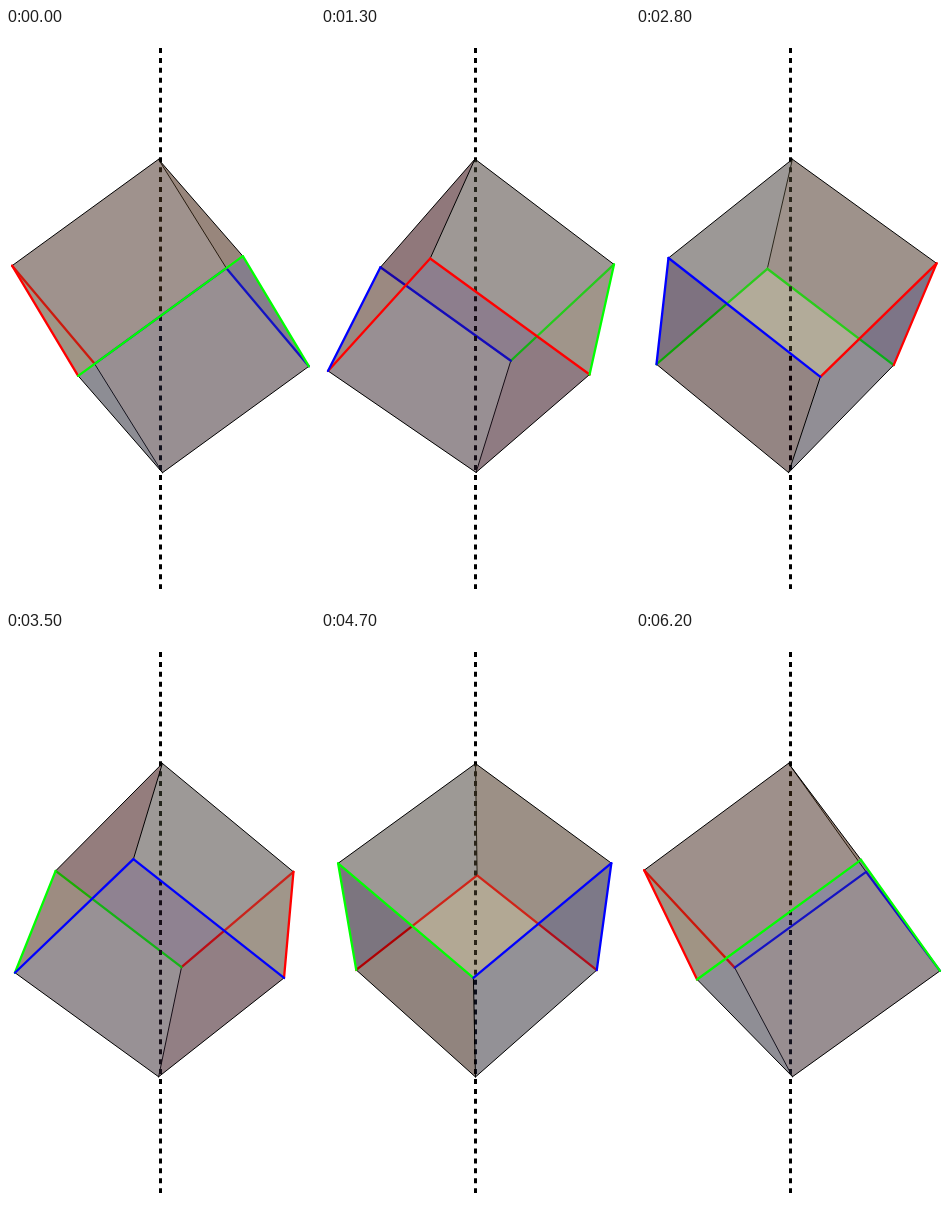
Write an HTML page with a canvas that moves like this. It is 309 by 576 pixels and loops after 6300 ms.

```html
<!DOCTYPE html>
<html lang="en">
<head>
<meta charset="utf-8">
<title>Cube spinning on its diagonal</title>
<style>
html, body { margin: 0; width: 100%; height: 100%; overflow: hidden; background: #fff; }
canvas { display: block; }
</style>
</head>
<body>
<canvas id="stage" width="309" height="576"></canvas>
<script>
const ctx = document.getElementById('stage').getContext('2d');
const CENTER = { x: 154.5, y: 288 };
const CAMERA = 1150;        // distance from the cube's centre
const RADIUS = 156.7;       // half of the body diagonal
const LEAN = 0.0128;        // the diagonal is slightly off the axis
const OPACITY = 0.35;
const STEP_MS = 100, STEPS = 63;
const COLORS = ['#f00', '#0f0', '#00f'];

// Corners 0-3: top and its three neighbours; 4-7: their opposites.
const opposite = i => (i + 4) % 8;
const upper = [[0, RADIUS, 0]];
for (let k = 0; k < 3; k++) {
  const a = (-90 + 120 * k) * Math.PI / 180;
  const r = RADIUS * Math.sqrt(8) / 3;
  upper.push([r * Math.sin(a), RADIUS / 3, r * Math.cos(a)]);
}
const leaned = upper.map(([x, y, z]) => [
  x * Math.cos(LEAN) - y * Math.sin(LEAN),
  x * Math.sin(LEAN) + y * Math.cos(LEAN),
  z
]);
const corners = [...leaned, ...leaned.map(p => p.map(v => -v))];

const faces = [], edges = [];
for (let k = 0; k < 3; k++) {
  const a = 1 + k, b = 1 + (k + 1) % 3, c = 1 + (k + 2) % 3;
  const face = [0, a, opposite(c), b];
  faces.push(face, face.map(opposite));
  edges.push({ ends: [0, a] }, { ends: [4, opposite(a)] });
}
for (let k = 0; k < 3; k++) {
  for (let j = 0; j < 3; j++) {
    if (j !== k) edges.push({ ends: [1 + k, 5 + j], color: COLORS[k] });
  }
}

function spin([x, y, z], angle) {
  const c = Math.cos(angle), s = Math.sin(angle);
  return [x * c + z * s, y, z * c - x * s];
}

function project([x, y, z]) {
  const scale = CAMERA / (CAMERA - z);
  return [CENTER.x + x * scale, CENTER.y - y * scale];
}

// Light reflected by a surface whose unit normal faces the viewer.
function shade([x, y, z]) {
  const light = [
    9 + Math.max(0, 2 * x + 18 * y + 28 * z),
    Math.max(0, 15 * x + 18 * y + 32 * z),
    2 + Math.max(0, 18 * x + 28 * z)
  ];
  return `rgba(${light.map(v => Math.round(v / OPACITY))},${OPACITY})`;
}

function trace(points) {
  ctx.beginPath();
  points.forEach(p => ctx.lineTo(p[0], p[1]));
}

function drawAxis() {
  ctx.strokeStyle = '#000';
  ctx.lineWidth = 3;
  ctx.lineCap = 'butt';
  ctx.setLineDash([5, 4.93]);
  trace([[154.5, 20], [154.5, 561]]);
  ctx.stroke();
  ctx.setLineDash([]);
}

function draw(angle) {
  const solid = corners.map(p => spin(p, angle));
  const flat = solid.map(project);

  const sides = faces.map(ids => {
    const mid = [0, 1, 2].map(i => ids.reduce((sum, id) => sum + solid[id][i], 0) / 4);
    const size = Math.hypot(...mid);
    const front = mid[2] * CAMERA > size * size;
    const normal = mid.map(v => (front ? v : -v) / size);
    return { ids, front, fill: shade(normal) };
  });
  const isFront = edge => sides.some(s => s.front && edge.ends.every(e => s.ids.includes(e)));

  const drawFaces = front => sides.filter(s => s.front === front).forEach(s => {
    trace(s.ids.map(id => flat[id]));
    ctx.fillStyle = s.fill;
    ctx.fill();
  });
  const drawEdges = front => edges.filter(e => isFront(e) === front).forEach(e => {
    trace(e.ends.map(id => flat[id]));
    ctx.strokeStyle = e.color || '#000';
    ctx.lineWidth = e.color ? 2.3 : 1;
    ctx.lineCap = 'round';
    ctx.stroke();
  });

  ctx.fillStyle = '#fff';
  ctx.fillRect(0, 0, 309, 576);
  drawFaces(false);
  drawEdges(false);
  drawAxis();
  drawFaces(true);
  drawEdges(true);
}

const start = performance.now();
function tick() {
  const step = Math.floor((performance.now() - start) / STEP_MS) % STEPS;
  draw(step / 10);   // one tenth of a radian per step
  requestAnimationFrame(tick);
}
tick();
</script>
</body>
</html>
```
